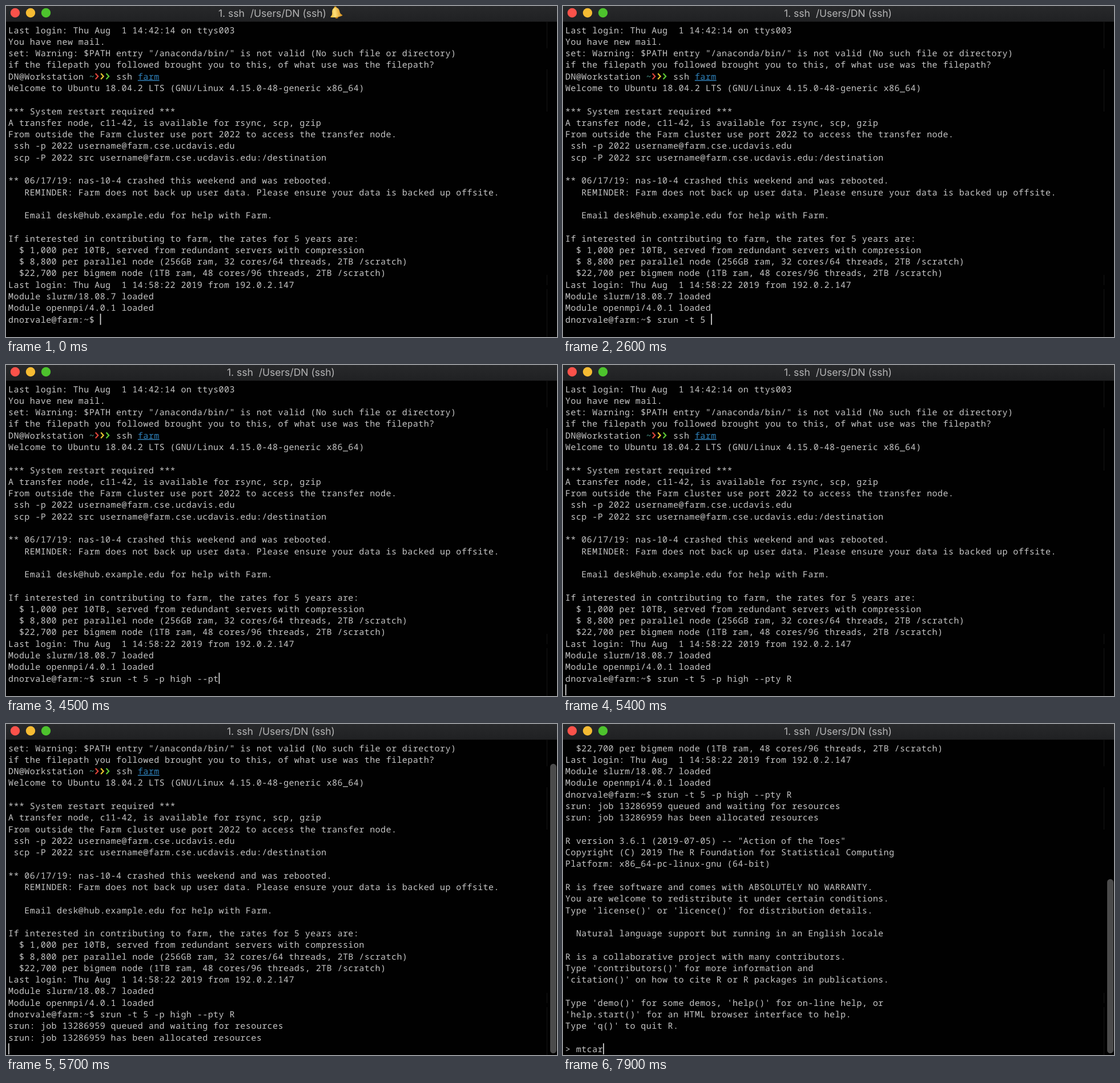
An HTML page for the animation above (8 s loop, 965x580 px).

```html
<!DOCTYPE html>
<html lang="en">
<head>
<meta charset="utf-8">
<title>Terminal</title>
<style>
html, body { margin: 0; width: 100%; height: 100%; overflow: hidden; background: #010101; }
svg { display: block; }
text { white-space: pre; text-rendering: geometricPrecision; }
#lines { font: 15px "Roboto Mono", "Noto Sans Mono", monospace; letter-spacing: .45px; fill: #c6c6c6; }
#title { font: 17.5px Inter, Roboto, sans-serif; fill: #b4b4b5; text-anchor: middle; }
.link { fill: #2f80b9; text-decoration: underline; }
.arrow { fill: none; stroke-width: 2.3; }
</style>
</head>
<body>
<svg width="965" height="580" viewBox="0 0 965 580">
  <defs>
    <linearGradient id="bar" x2="0" y2="1"><stop stop-color="#28292b"/><stop offset="1" stop-color="#202123"/></linearGradient>
    <linearGradient id="gold"><stop stop-color="#f0b429"/><stop offset=".4" stop-color="#ffe07a"/><stop offset="1" stop-color="#d78d17"/></linearGradient>
  </defs>
  <path d="M947.5 28v46M947.5 111v74M947.5 471v18M947.5 496v84" stroke="#161616"/>
  <svg y="32" width="965" height="548" viewBox="0 32 965 548">
    <g id="lines"></g>
  </svg>
  <rect id="thumb" x="953" width="11" rx="5.5" fill="#4b4b4b"/>
  <rect width="965" height="27" fill="url(#bar)"/>
  <rect y="27" width="965" height="1" fill="#111"/>
  <circle cx="16" cy="12" r="8.2" fill="#fb524a"/>
  <circle cx="43" cy="12" r="8.2" fill="#f5bb33"/>
  <circle cx="70" cy="12" r="8.2" fill="#4dc22d"/>
  <text id="title" y="19" xml:space="preserve">1. ssh  /Users/DN (ssh)</text>
  <g id="bell" transform="rotate(-8 578 12)">
    <circle cx="578" cy="19" r="3" fill="#b97812"/>
    <circle cx="578" cy="3" r="2.4" fill="#e5a524"/>
    <path d="M578 3c5 0 6.500 4 6.700 8 .2 3.500 1.600 4.500 4 6.500q0 2-10.700 2t-10.700-2c2.400-2 3.800-3 4-6.500 .2-4 1.700-8 6.700-8z" fill="url(#gold)"/>
  </g>
</svg>
<script>
const LOOP = 8000, COL = 9.45, ROW = 20.28, LEFT = 4, BASE = 47.6, ROWS = 27;
const SHELL = 25, RPROMPT = 47;
const $ = id => document.getElementById(id);
const baseline = i => BASE + i * ROW;

const screen = `Last login: Thu Aug  1 14:42:14 on ttys003
You have new mail.
set: Warning: $PATH entry "/anaconda/bin/" is not valid (No such file or directory)
if the filepath you followed brought you to this, of what use was the filepath?
DN@Workstation <tspan fill="#4f9f91">~</tspan>    ssh <tspan class="link">farm</tspan>
Welcome to Ubuntu 18.04.2 LTS (GNU/Linux 4.15.0-48-generic x86_64)

*** System restart required ***
A transfer node, c11-42, is available for rsync, scp, gzip
From outside the Farm cluster use port 2022 to access the transfer node.
 ssh -p 2022 username@farm.cse.ucdavis.edu
 scp -P 2022 src username@farm.cse.ucdavis.edu:/destination

** 06/17/19: nas-10-4 crashed this weekend and was rebooted.
   REMINDER: Farm does not back up user data. Please ensure your data is backed up offsite.

   Email desk@hub.example.edu for help with Farm.

If interested in contributing to farm, the rates for 5 years are:
  $ 1,000 per 10TB, served from redundant servers with compression
  $ 8,800 per parallel node (256GB ram, 32 cores/64 threads, 2TB /scratch)
  $22,700 per bigmem node (1TB ram, 48 cores/96 threads, 2TB /scratch)
Last login: Thu Aug  1 14:58:22 2019 from 192.0.2.147
Module slurm/18.08.7 loaded
Module openmpi/4.0.1 loaded
dnorvale@farm:~$ 
srun: job 13286959 queued and waiting for resources
srun: job 13286959 has been allocated resources

R version 3.6.1 (2019-07-05) -- "Action of the Toes"
Copyright (C) 2019 The R Foundation for Statistical Computing
Platform: x86_64-pc-linux-gnu (64-bit)

R is free software and comes with ABSOLUTELY NO WARRANTY.
You are welcome to redistribute it under certain conditions.
Type 'license()' or 'licence()' for distribution details.

  Natural language support but running in an English locale

R is a collaborative project with many contributors.
Type 'contributors()' for more information and
'citation()' on how to cite R or R packages in publications.

Type 'demo()' for some demos, 'help()' for on-line help, or
'help.start()' for an HTML browser interface to help.
Type 'q()' to quit R.

> `.split("\n");

const arrows = ["#d8443a", "#e3c22f", "#5cc534"].map((color, i) =>
  `<path class="arrow" stroke="${color}" d="M${LEFT + (16 + i) * COL + 1.5} ${baseline(4) - 10.5}l4.500 5-4.500 5"/>`);

$("lines").innerHTML = screen.map((line, i) =>
  `<text x="${LEFT}" y="${baseline(i)}" xml:space="preserve">${line}</text>`).join("") +
  arrows.join("") + `<rect id="cursor" width="1.7" height="19.5" fill="#d8d8d8"/>`;
const rows = [...document.querySelectorAll("#lines text")];

// Characters typed at time t, one every step ms
const typed = (text, t, start, step) =>
  text.slice(0, Math.max(0, Math.floor((t - start) / step)));

// Row that holds the cursor
const lineAt = t => t < 5200 ? SHELL : t < 5500 ? 26 : t < 5600 ? 27 : t < 6000 ? 28 : RPROMPT;

function draw(t) {
  const line = lineAt(t), scroll = Math.max(0, line + 1 - ROWS);
  const prompts = {
    [SHELL]: "dnorvale@farm:~$ " + typed("srun -t 5 -p high --pty R", t, 950, 160),
    [RPROMPT]: "> " + typed("mtcar", t, 7525, 75)
  };
  for (const i in prompts) rows[i].textContent = prompts[i];
  const atPrompt = line in prompts;
  const shown = atPrompt ? line + 1 : line;
  rows.forEach((row, i) => row.style.display = i < shown ? "" : "none");

  const column = atPrompt ? prompts[line].length : 0;
  $("cursor").setAttribute("x", LEFT + column * COL);
  $("cursor").setAttribute("y", baseline(line) - 15.4);
  $("lines").setAttribute("transform", `translate(0 ${-scroll * ROW})`);

  const top = 32 + 548 * scroll / (scroll + ROWS);
  $("thumb").setAttribute("y", top);
  $("thumb").setAttribute("height", 577 - top);
  $("thumb").style.display = scroll ? "" : "none";

  const ringing = t < 500;
  $("bell").style.display = ringing ? "" : "none";
  $("title").setAttribute("x", ringing ? 466.5 : 481.5);
}

const begin = performance.now();
function tick() {
  draw((performance.now() - begin) % LOOP);
  requestAnimationFrame(tick);
}
tick();
</script>
</body>
</html>
```
